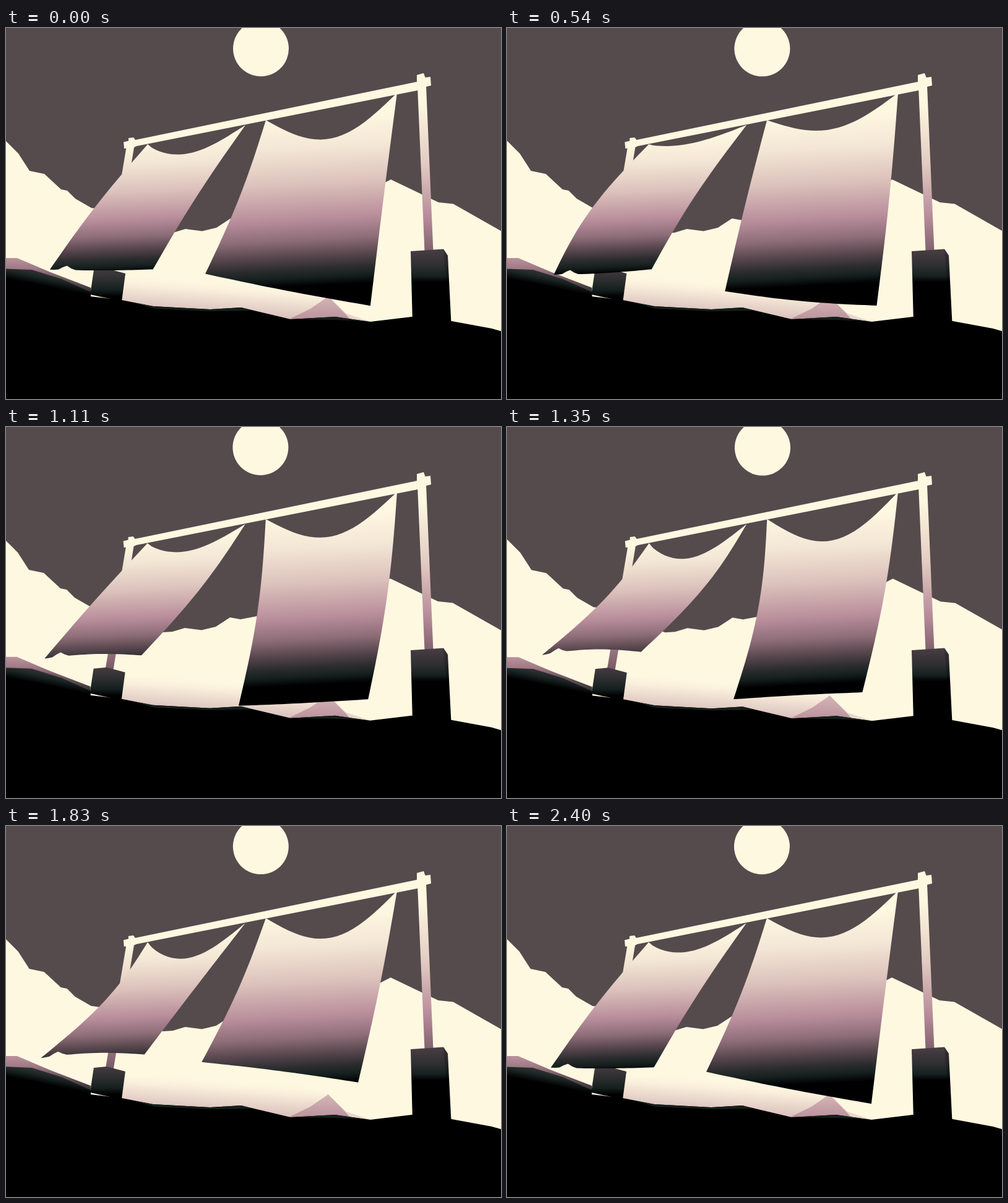
An HTML page with a canvas that plays this animation: 800 by 600 pixels, repeating every 2.43 s.

```html
<!DOCTYPE html>
<html lang="en">
<head>
<meta charset="utf-8">
<title>Cloths in the wind</title>
<style>
html, body { margin: 0; width: 100%; height: 100%; overflow: hidden; background: #554b4d; }
canvas { display: block; }
</style>
</head>
<body>
<canvas id="stage" width="800" height="600"></canvas>
<script>
const ctx = document.getElementById('stage').getContext('2d');
const LOOP = 2430, STEP = 30, CYCLE = 2400;
const CREAM = '#fff8e1', SKY = '#554b4d';
const { PI, sin, cos, exp } = Math;

// Vertical gradient from [y, colour] stops; slope tilts the bands around cx.
function shade(stops, cx = 0, slope = 0) {
  const y0 = stops[0][0], h = stops[stops.length - 1][0] - y0;
  const k = h / (1 + slope * slope);
  const g = ctx.createLinearGradient(cx, y0, cx - slope * k, y0 + k);
  for (const [y, c] of stops) g.addColorStop((y - y0) / h, c);
  return g;
}

// The fog fades every cloth through the same tones, from top to bottom.
function fog(top, bottom, cx, slope) {
  const tones = [[0, CREAM], [0.2, '#f3e6d5'], [0.4, '#dcc2bc'], [0.61, '#b88d9b'],
    [0.73, '#8d6d78'], [0.82, '#5a484f'], [0.9, '#2b2c2e'], [0.95, '#15201e'], [1, '#000']];
  return shade(tones.map(([f, c]) => [top + (bottom - top) * f, c]), cx, slope);
}

function poly(fill, ...p) {
  ctx.beginPath();
  for (let i = 0; i < p.length; i += 2) ctx.lineTo(p[i], p[i + 1]);
  ctx.closePath();
  ctx.fillStyle = fill;
  ctx.fill();
}

function shifted(dx, dy, draw) {
  ctx.save();
  ctx.translate(dx, dy);
  draw();
  ctx.restore();
}

const paint = {
  haze: shade([[404, 'rgba(255,248,225,0)'], [430, '#f4e6d6'], [466, '#d5bab8']], 320, 0.07),
  peak: shade([[434, '#d4b6b6'], [472, '#bb929d']]),
  facet: shade([[434, '#dcc3be'], [475, '#ecdacf']]),
  farHill: shade([[371, '#bd929d'], [388, '#a17b87'], [404, '#705861'], [428, '#332f32']]),
  nearHill: shade([[388, '#3c3539'], [400, '#1b2624'], [413, '#000']], 40, 0.2),
  rightPost: shade([[120, CREAM], [220, '#e2cbc2'], [308, '#b68998'], [360, '#80626d']]),
  leftPost: shade([[190, CREAM], [260, '#e2cbc2'], [350, '#a57d89'], [392, '#755a64']]),
  rightBox: shade([[356, '#4a3f44'], [384, '#2f2f31'], [401, '#17211f'], [411, '#000']]),
  leftBox: shade([[388, '#463b41'], [409, '#2a2d2d'], [424, '#141f1d'], [434, '#000']])
};

// Main swing of the wind plus its overtone; phases in degrees.
const wave = (mean, amp, phase, amp2 = 0, phase2 = 0) => a =>
  mean + amp * cos(a - phase * PI / 180) + amp2 * cos(2 * a - phase2 * PI / 180);

const cloths = [
  {
    paint: fog(176, 396, 190, -0.04), pins: [[229, 188], [387, 157]], skew: 0.8, curl: 7,
    leftX: wave(65.3, 11, 60), leftY: wave(383.6, 15, 50, 2.5, 170),
    rightX: wave(227.5, 11, 25), rightY: wave(378.5, 15.5, 40),
    sag: wave(27, 14, 265, 3.5, 55), hem: wave(-2, 5, 45),
    leftBow: wave(0, 19, 255, 5, 100), rightBow: wave(0.3, 10, 205, 5.5, 45)
  },
  {
    paint: fog(140, 417, 490, -0.05), pins: [[420, 149], [632, 105]], skew: 1, curl: 0,
    leftX: wave(342.6, 32, 145, 6.5, 30), leftY: wave(415, 34, 140, 10, 30),
    rightX: wave(584, 15, 75, 2, -60), rightY: wave(437, 18, 70, 6, 0),
    sag: wave(48.5, 9, 265, 4, 20), hem: wave(1, 3.2, 75),
    leftBow: wave(5.5, 5, 245, 3.5, 30), rightBow: wave(3.5, 4, 180)
  }
];

// Points from p to q, pushed away from the straight line along one axis.
function side(p, q, axis, bend, n = 24) {
  return Array.from({ length: n + 1 }, (_, i) => {
    const f = i / n;
    const m = [p[0] + (q[0] - p[0]) * f, p[1] + (q[1] - p[1]) * f];
    m[axis] += bend(f);
    return m;
  });
}

const bow = size => f => size * sin(PI * f);

function drawCloth(c, a, sway) {
  const [p, q] = c.pins.map(([x, y]) => [x + sway * 1.3 * (1 - x / 640), y]);
  const left = [c.leftX(a), c.leftY(a)], right = [c.rightX(a), c.rightY(a)];
  const sag = c.sag(a), hem = bow(c.hem(a));
  const curl = f => c.curl * exp(-(((f - 0.16) / 0.05) ** 2));
  poly(c.paint, ...[
    side(p, q, 1, f => sag * sin(PI * f ** c.skew)),
    side(q, right, 0, bow(c.rightBow(a))),
    side(left, right, 1, f => hem(f) - curl(f)).reverse(),
    side(p, left, 0, bow(c.leftBow(a))).reverse()
  ].flat(2));
}

function drawMountains() {
  poly(CREAM, -10, 173, 0, 183, 20, 203, 38, 231, 62, 236, 89, 261, 99, 263, 112, 276,
    138, 291, 152, 293, 254, 332, 270, 331, 290, 325, 317, 328.5, 340, 323, 363, 308,
    380, 311, 560, 277, 622, 245, 699, 282, 723, 284.5, 810, 334, 810, 520, -10, 520);
}

function drawGround() {
  poly(paint.haze, 150, 400, 460, 415, 520, 434, 520, 480, 150, 480);
  poly(paint.facet, 520, 434, 550, 462, 590, 475, 500, 475);
  poly(paint.peak, 455, 472, 492, 454, 521, 434, 549, 463, 560, 475);
  poly(paint.farHill, -10, 372, 18, 372, 72, 395, 137, 420, 137, 440, -10, 440);
  poly(paint.nearHill, -10, 389, 42, 391, 90, 406, 137, 427, 137, 450, -10, 450);
  poly('#000', -10, 406, 45, 412, 136, 434, 187, 440, 238, 450, 330, 455, 380, 452,
    460, 471, 532, 467, 589, 475, 656, 467, 720, 474, 785, 486, 810, 493, 810, 610, -10, 610);
  poly('#14201d', 205, 444, 238, 450, 330, 455, 380, 452, 400, 457, 330, 458, 240, 454);
  poly('#14201d', 460, 471, 532, 467, 580, 474, 530, 472);
}

function drawFrame(s) {
  shifted(s, s * 0.3, () => {
    poly(paint.leftPost, 195, 190, 207.5, 190, 174, 392, 161, 392);
    poly(paint.leftBox, 142, 391, 163, 389, 193, 397, 187, 442, 136, 431);
  });
  poly(paint.rightPost, 665, 94, 679, 94, 690.5, 361, 676.5, 361);
  poly(paint.rightBox, 654, 361, 707, 357.5, 714, 368, 719.5, 477, 657, 477);
  poly('rgba(0,0,0,.2)', 707, 357.5, 714, 368, 716, 410, 711, 410);
  poly(CREAM, 190 + s, 184.5, 198 + s, 182.5, 198 + s, 178, 206 + s, 177, 209 + s, 181,
    664, 87, 664, 76, 675, 73, 677.5, 80, 686, 79, 687, 93, 679, 95, 665, 101,
    211 + s, 191, 207 + s, 193, 191 + s, 195);
}

function render(t) {
  const a = t / CYCLE * 2 * PI, sway = sin(2 * a);
  ctx.fillStyle = SKY;
  ctx.fillRect(0, 0, 800, 600);
  ctx.beginPath();
  ctx.arc(412 + sway * 1.4, 33.2 + sway * 0.5, 45, 0, 2 * PI);
  ctx.fillStyle = CREAM;
  ctx.fill();
  shifted(sway * 2.2, sway * 0.2, drawMountains);
  shifted(sway, sway * 0.4, drawGround);
  drawFrame(sway);
  for (const c of cloths) drawCloth(c, a, sway);
}

function tick() {
  const t = performance.now() % LOOP;
  render(Math.floor(t / STEP) * STEP % CYCLE);
  requestAnimationFrame(tick);
}
tick();
</script>
</body>
</html>
```
